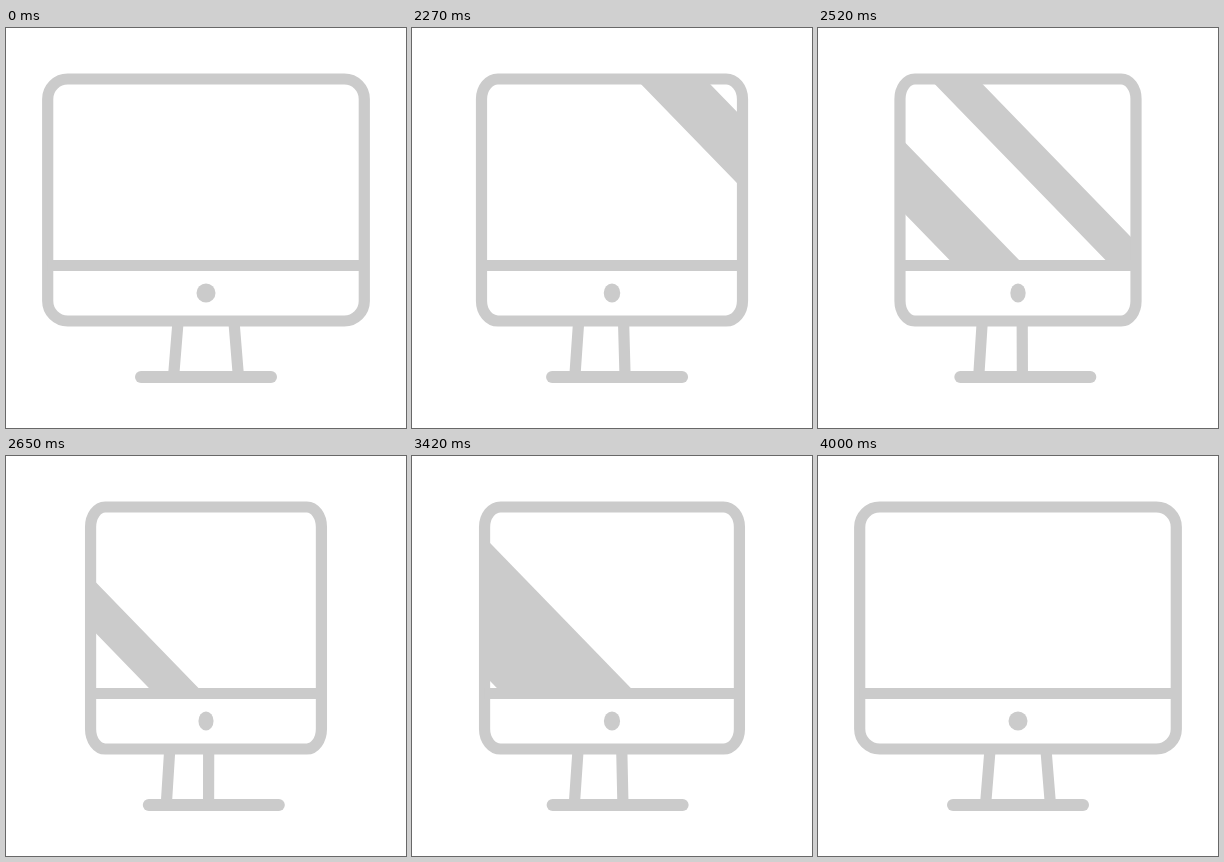
Write an HTML page that moves like this. It is 400 px wide and 400 px high and loops after 4020 ms.

```html
<!DOCTYPE html>
<html lang="en">
<head>
<meta charset="utf-8">
<title>Turning monitor</title>
<style>
  html, body { margin: 0; width: 100%; height: 100%; overflow: hidden; background: #fff; }
  svg { display: block; width: 100%; height: 100%; }
  .line { fill: none; stroke: #cbcbcb; stroke-width: 11.2; }
  .fill { fill: #cbcbcb; }
</style>
</head>
<body>
<svg viewBox="0 0 400 400">
  <clipPath id="screen"><rect id="screenBox" y="51" height="186.5"/></clipPath>
  <g clip-path="url(#screen)">
    <path id="glare" class="fill"/>
  </g>
  <path id="legs" class="line"/>
  <path id="foot" class="line" stroke-linecap="round" style="stroke-width:12"/>
  <rect id="frame" class="line" y="51" height="242" ry="20"/>
  <path id="bar" class="line"/>
  <ellipse id="button" class="fill" cx="200" cy="265" ry="9.5"/>
</svg>
<script>
const LOOP = 4020, TURN = 2016, BACK = 3000, END = 4000;
const $ = id => document.getElementById(id);
const clamp = v => Math.min(1, Math.max(0, v));
const mix = (a, b, p) => a + (b - a) * p;
const outCubic = p => 1 - (1 - p) ** 3;
const inOutCubic = p => p < 0.5 ? 4 * p ** 3 : 1 - 4 * (1 - p) ** 3;
const inOutSine = p => (1 - Math.cos(Math.PI * p)) / 2;

function set(id, attrs) {
  for (const name in attrs) $(id).setAttribute(name, attrs[name]);
}

// Diagonal stripe whose edges cross the top of the screen at left and right
function stripe(left, right) {
  const at = (x, y) => `${x + (y - 57) / 1.03} ${y}`;
  return `M${at(left, 40)}L${at(right, 40)}L${at(right, 240)}L${at(left, 240)}Z`;
}

function turnAt(t) {
  return t < BACK
    ? outCubic(clamp((t - TURN) / 900))
    : 1 - inOutCubic(clamp((t - BACK) / (END - BACK)));
}

function glareAt(t) {
  if (t < TURN || t >= END) return "";
  if (t < BACK) {
    const s = inOutSine((t - 2000) / 1000);
    return stripe(356 - 740 * s, 425 - 739 * s) + stripe(512 - 740 * s, 555 - 731 * s);
  }
  const p = (t - BACK) / (END - BACK);
  const s = mix(p, inOutSine(p), 0.5);
  return stripe(-398 + 784 * s, -246 + 739 * s);
}

function draw(t) {
  const turn = turnAt(t);
  const half = 158.3 - 44 * turn;
  const scale = half / 158.3;
  const box = { x: 200 - half, width: 2 * half };
  set("frame", { ...box, rx: 20 * scale });
  set("screenBox", { ...box, rx: 0 });
  set("bar", { d: `M${200 - half} 237.5H${200 + half}` });
  set("button", { rx: 9.5 * mix(1, 0.79, turn) });
  set("legs", {
    d: `M${172 - 8.5 * turn} 294L${167.7 - 7.5 * turn} 347` +
       `M${228 - 26 * turn} 294L${232.3 - 30.5 * turn} 347`
  });
  set("foot", { d: `M${135 + 8 * turn} 349H${265 + 8 * turn}` });
  set("glare", { d: glareAt(t) });
}

const start = performance.now();
function tick() {
  draw((performance.now() - start) % LOOP);
  requestAnimationFrame(tick);
}
tick();
</script>
</body>
</html>
```
